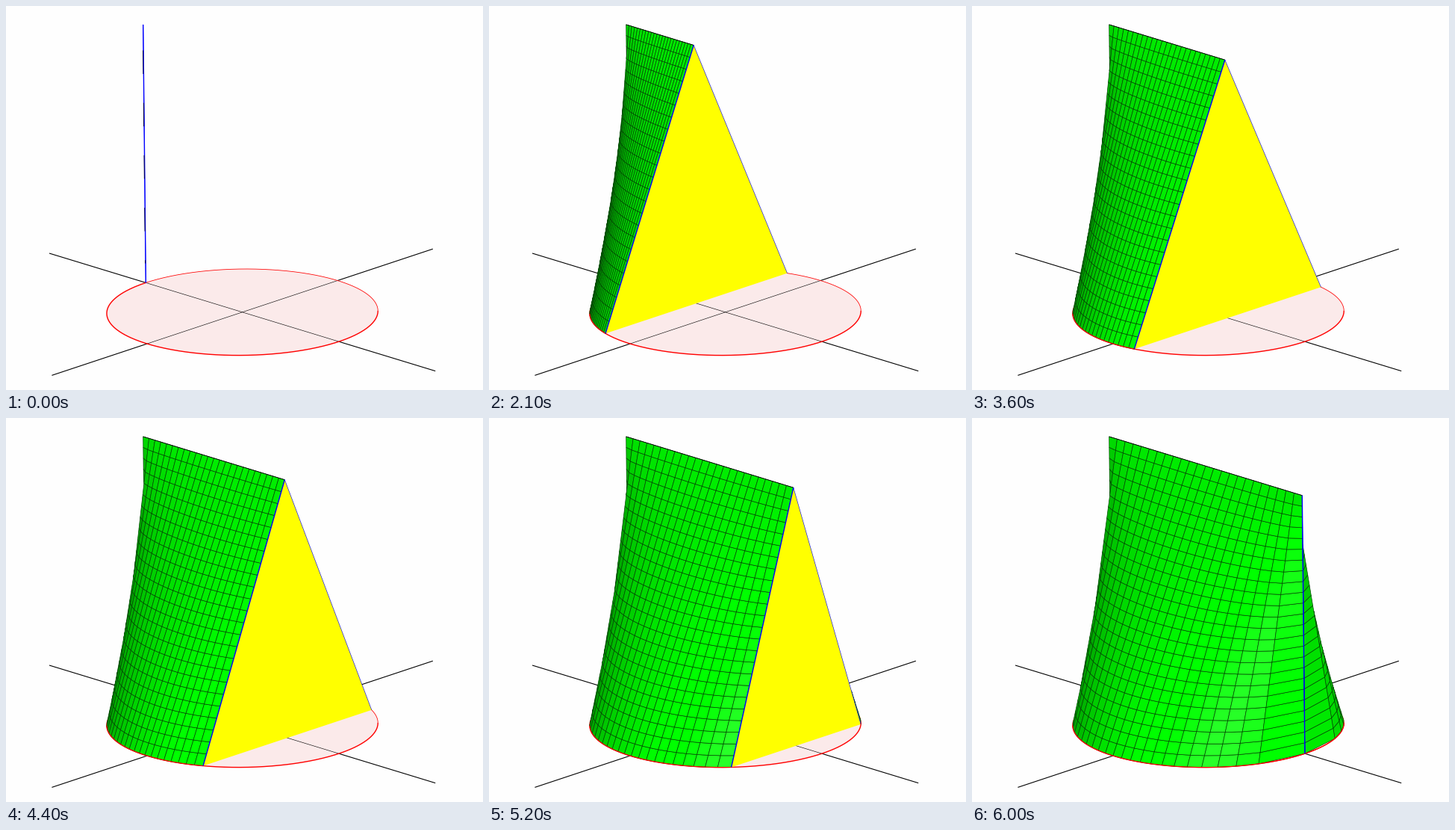
These frames come from a looping animation (639 by 514 pixels, 6100 ms). A matplotlib script:

```python
import numpy as np
import matplotlib.pyplot as plt
from matplotlib.animation import FuncAnimation
from matplotlib.collections import PolyCollection

W, H, DPI = 639, 514, 64
PX = 72 / DPI          # one pixel in points
FRAMES, STEP_MS = 61, 100
CELLS = 24             # grid cells in each direction
HEIGHT = 2.0

# Screen position of the origin and of the unit vectors (parallel projection)
ORIGIN = np.array([316.6, 409.8])
AXES = np.array([[129.3, 39.4], [127.6, -42.3], [-1.8, -172.75]])
LIGHT = np.array([0.75, -0.45, 0.48])
HALFWAY = np.array([0.71, -0.56, 0.40])   # between light and viewer

BLUE, RED, YELLOW = "#0000ff", "#ff0000", "#ffff00"
PAPER, DISC, MESH = "#fefefe", "#fbeaea", "#004800"


def project(x, y, z=0.0):
    pts = np.stack(np.broadcast_arrays(x, y, z), axis=-1)
    return ORIGIN + pts @ AXES


def half_width(x):
    return np.sqrt(np.clip(1 - x * x, 0, None))


def arc(start, end, side):
    """Part of the base circle; angles run from x = -1 to x = 1."""
    a = np.linspace(start, end, 160)
    return project(-np.cos(a), side * np.sin(a))


def shade(x, z, side):
    """Green with diffuse light and a soft highlight."""
    s = np.maximum(half_width(x), 1e-6)
    normal = np.stack([x * (1 - z / HEIGHT) / s, side * np.ones_like(x),
                       s / HEIGHT], axis=-1)
    normal /= np.linalg.norm(normal, axis=-1, keepdims=True)
    green = np.clip(0.62 + 0.5 * np.clip(normal @ LIGHT, 0, 1), 0, 1)
    glow = 0.17 * np.clip((normal @ HALFWAY - 0.88) / 0.09, 0, 1) ** 1.5
    return np.stack([glow, green, glow], axis=-1)


def surface(t, side):
    """Cells of one half of the conoid that face the viewer, far to near."""
    x = np.linspace(-1, t, CELLS + 1)[:, None]
    z = np.linspace(0, HEIGHT, CELLS + 1)[None, :]
    p = project(x, side * half_width(x) * (1 - z / HEIGHT), z)
    cells = np.stack([p[:-1, :-1], p[1:, :-1], p[1:, 1:], p[:-1, 1:]], axis=2)
    xm, zm = np.broadcast_arrays((x[:-1] + x[1:]) / 2,
                                 (z[:, :-1] + z[:, 1:]) / 2)
    cells, colors = cells.reshape(-1, 4, 2), shade(xm, zm, side).reshape(-1, 3)
    a, b = cells[:, 2] - cells[:, 0], cells[:, 3] - cells[:, 1]
    facing = side * (a[:, 0] * b[:, 1] - a[:, 1] * b[:, 0]) > 0
    return cells[facing], colors[facing]


fig = plt.figure(figsize=(W / DPI, H / DPI), dpi=DPI, facecolor=PAPER)
ax = fig.add_axes([0, 0, 1, 1])
ax.set_xlim(0, W)
ax.set_ylim(H, 0)
ax.axis("off")


def line(pts, color, width, z, **kw):
    pts = np.asarray(pts)
    return ax.plot(pts[:, 0], pts[:, 1], color=color, lw=width * PX,
                   zorder=z, solid_capstyle="butt", **kw)[0]


# Ground: disc, its rim and the two axes
ax.fill(*arc(0, 2 * np.pi, 1).T, color=DISC, lw=0, zorder=1)
line(arc(0, 0.75 * np.pi, 1), RED, 0.8, 3)
line(arc(0.75 * np.pi, np.pi, 1), RED, 1.4, 3)
line(arc(0, np.pi, -1), RED, 1.4, 3)
for dx, dy in ((1, 0), (0, 1)):
    span = np.array([-2, -1, 1, 2])
    p = project(dx * span, dy * span)
    line(p[:2], "black", 1.1, 2)
    line(p[1:3], "black", 0.6, 2)
    line(p[2:], "black", 1.1, 2)

mesh = PolyCollection([], edgecolors=MESH, linewidths=0.7 * PX, zorder=4)
ax.add_collection(mesh)
triangle = ax.fill([0, 0, 0], [0, 0, 0], color=YELLOW, lw=0, zorder=5)[0]
top_edge = line([[0, 0]], "black", 0.8, 6)
rims = [line([[0, 0]], RED, 1.1, 6) for _ in range(2)]
near_edge = line([[0, 0]], BLUE, 1.4, 7)
far_edge = line([[0, 0]], BLUE, 0.6, 7)

# Dark traces along the first, still upright, ruling
upright = project(-1, 0, np.array([1.8, 0.15])) - [0.5, 0]
traces = line(upright, "#000030", 0.9, 8, dashes=(35, 43))


def update(k):
    t = -1 + 2 * k / (FRAMES - 1)
    s = half_width(t)
    apex, near, far = project(t, 0, HEIGHT), project(t, -s), project(t, s)

    if k:
        back, back_colors = surface(t, 1)
        front, front_colors = surface(t, -1)
        mesh.set_verts(np.concatenate([back, front]))
        mesh.set_facecolors(np.concatenate([back_colors, front_colors]))
    else:
        mesh.set_verts([])

    triangle.set_xy([near, apex, far])
    near_edge.set_data(*np.array([near, apex]).T)
    far_edge.set_data(*np.array([far, apex]).T)
    top_edge.set_data(*np.array([project(-1, 0, HEIGHT), apex]).T)

    # Base rim that stays visible in front of the surface
    angle = np.arccos(np.clip(-t, -1, 1))
    for rim, start, side in zip(rims, (np.pi / 4, 3 * np.pi / 4), (-1, 1)):
        rim.set_data(*arc(start, max(start, angle), side).T)

    traces.set_visible(k == 0)
    return [mesh, triangle, top_edge, near_edge, far_edge, traces, *rims]


anim = FuncAnimation(fig, update, frames=FRAMES, interval=STEP_MS,
                     repeat=True, repeat_delay=0)
plt.show()
```
